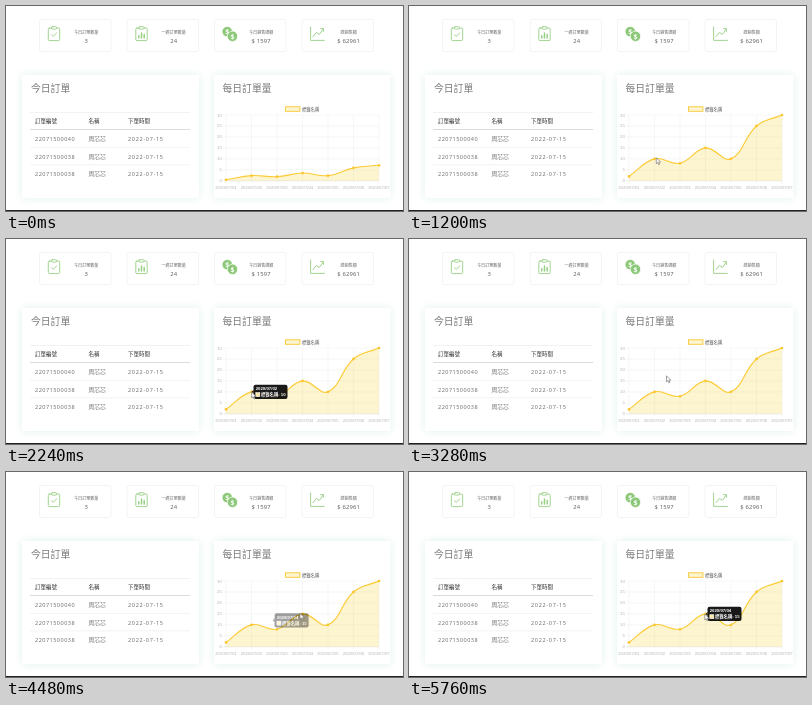
These frames come from a looping animation (397x205 px, 6.16 s). An HTML page:

```html
<!DOCTYPE html>
<html lang="zh-Hant">
<head>
<meta charset="utf-8">
<title>訂單</title>
<style>
  html, body { margin: 0; width: 100%; height: 100%; overflow: hidden; background: #fff; }
  svg { display: block; width: 100%; height: 100%; }
  text { font-family: "Open Sans", "Noto Sans CJK TC", "Noto Sans CJK JP", sans-serif; fill: #555; }
  .title { font-size: 9.8px; font-weight: 300; fill: #777; }
  .label { font-size: 4.05px; text-anchor: middle; fill: #666; }
  .total { font-size: 5.8px; text-anchor: middle; letter-spacing: .2px; }
  .head { font-size: 5.5px; fill: #333; font-weight: 500; }
  .cell { font-size: 5.5px; letter-spacing: .5px; fill: #666; }
  .name { font-size: 5.8px; fill: #777; }
  .date { font-size: 5.5px; letter-spacing: .7px; }
  .chart text, .tip text { font-family: "Liberation Sans", "Noto Sans CJK TC", "Noto Sans CJK JP", sans-serif; font-size: 4.3px; }
  .chart .tick { fill: #b4b4b4; }
  .tip text { fill: #fff; font-weight: 700; }
  .card { fill: #fff; stroke: #eef1f1; stroke-width: .8; }
  .panel { fill: #fff; filter: drop-shadow(0 0 4px #e0f1ef); }
  .icon { fill: none; stroke: #98cf85; stroke-width: .9; stroke-linejoin: round; stroke-linecap: round; }
  .icon .solid { fill: #8cc878; stroke: none; }
</style>
</head>
<body>
<svg id="stage" viewBox="0 0 397 205" preserveAspectRatio="none"></svg>
<script>
const LOOP = 6160;
const values = [2, 10, 8, 15, 10, 25, 30];
const BASE = 174.8, TOP = 109;
const px = i => 220 + i * 25.5;
const py = v => BASE - v * (BASE - TOP) / 30;
const day = i => `2020/07/0${i + 1}`;
const clamp = (v, a, b) => Math.min(b, Math.max(a, v));
const easeOut = t => 1 - (1 - clamp(t, 0, 1)) ** 4;

const text = (x, y, s, cls, extra = '') => `<text x="${x}" y="${y}" class="${cls}" ${extra}>${s}</text>`;
const line = (x1, y1, x2, y2, color, w = .5) =>
  `<path d="M${x1} ${y1}L${x2} ${y2}" stroke="${color}" stroke-width="${w}"/>`;

const clipboard = inner => `<rect x="8.8" y="22" width="11.4" height="12.6" rx="1.2"/>
  <rect x="12" y="20.7" width="5" height="2.4" rx=".8" fill="#fff"/>${inner}`;
const coin = (x, y) => `<circle class="solid" cx="${x}" cy="${y}" r="5.2" style="stroke:#fff;stroke-width:.7"/>` +
  text(x, y + 2.5, '$', '', 'style="font-size:7px;font-weight:700;fill:#fff;stroke:none" text-anchor="middle"');

const cards = [
  ['今日訂單數量', '3', clipboard('<path d="M12 28.6l1.8 1.8 3.4-3.6"/>')],
  ['一週訂單數量', '24', clipboard('<path d="M11.8 32v-2.2M14.5 32v-5M17.2 32v-3.6" stroke-width="1.5"/>')],
  ['今日銷售總額', '$ 1597', coin(12.8, 25.6) + coin(18, 30.3)],
  ['總銷售額', '$ 62961', '<path d="M8.6 21v13.4h13.8M11 30.6l3.4-4.2 3 2 4-5.6M18.6 22.6h2.8v2.8"/>']
].map(([label, total, icon], i) => `<g transform="translate(${33.5 + i * 87.5} 0)">
  <rect class="card" x="0" y="13.5" width="71.5" height="32" rx="2"/>
  <g class="icon">${icon}</g>
  ${text(46.7, 27.6, label, 'label')}${text(46.7, 37.4, total, 'total')}</g>`).join('');

const rows = ['22071500040', '22071500038', '22071500038'].map((id, i) => {
  const y = 135.2 + i * 17.4;
  return text(29, y, id, 'cell') + text(82.5, y, '周芯芯', 'name') + text(122, y, '2022-07-15', 'cell date') +
    (i ? line(24, y - 11.2, 184, y - 11.2, '#e6e8e8') : '');
}).join('');

const table = text(25, 86.2, '今日訂單', 'title') +
  line(24, 106.5, 184, 106.5, '#e2e6e6') + line(24, 123.5, 184, 123.5, '#cfd4d4', .8) +
  text(29, 117.3, '訂單編號', 'head') + text(82.5, 117.3, '名稱', 'head') + text(122, 117.3, '下單時間', 'head') + rows;

let grid = '';
for (let v = 0; v <= 30; v += 5) {
  grid += line(217, py(v), px(6), py(v), v ? '#ececec' : '#d8d8d8') +
    text(215.8, py(v) + 1.5, v, 'tick', 'text-anchor="end"');
}
values.forEach((v, i) => {
  grid += line(px(i), TOP, px(i), 177.5, '#ececec') + text(px(i), 182.6, day(i), 'tick', 'text-anchor="middle"');
});

document.getElementById('stage').innerHTML = `
  ${cards}
  <rect class="panel" x="16" y="69" width="177" height="123" rx="1"/>
  <rect class="panel" x="208" y="69" width="176.5" height="123" rx="1"/>
  ${table}
  ${text(216.5, 86.2, '每日訂單量', 'title')}
  <g class="chart">
    <rect x="279.5" y="100.8" width="14.4" height="4.5" fill="#fdf4d0" stroke="#fbcd45"/>
    ${text(296, 104.7, '標籤名稱', '')}
    ${grid}
    <path id="area" fill="#f7d23a" fill-opacity=".24"/>
    <path id="curve" fill="none" stroke="#fccb35" stroke-width="1.1"/>
    <g id="dots" fill="#fbc62e"></g>
  </g>
  <g id="tip" class="tip">
    <path d="M0 5.4l-1.8 1.8 1.8 1.8z" fill-opacity=".9"/>
    <rect width="34" height="14.4" rx="2" fill-opacity=".9"/>
    <text id="tipTitle" x="2.2" y="5.7"></text>
    <rect x="2.3" y="8" width="4" height="4" fill="#fbe7a6" stroke="#fff" stroke-width=".6"/>
    <text id="tipBody" x="7.5" y="11.8"></text>
  </g>
  <path id="cursor" d="M0 0v6l1.4-1.2 1 2.2 1-.45-1-2.1h1.9z" fill="#fff" stroke="#666" stroke-width=".6" stroke-linejoin="round"/>
  <rect y="204" width="397" height="1" fill="#222"/>`;

const el = id => document.getElementById(id);

// Smooth curve with tension 0.4, handles kept inside the plot
function curvePath(p) {
  const handles = p.map((c, i) => {
    const a = p[i - 1] || c, b = p[i + 1] || c;
    const d1 = Math.hypot(c[0] - a[0], c[1] - a[1]), d2 = Math.hypot(b[0] - c[0], b[1] - c[1]);
    const at = k => [c[0] + k * (b[0] - a[0]), clamp(c[1] + k * (b[1] - a[1]), TOP, BASE)];
    return { before: at(-.4 * d1 / (d1 + d2)), after: at(.4 * d2 / (d1 + d2)) };
  });
  return 'M' + p[0] + p.slice(1).map((c, i) => `C${handles[i].after} ${handles[i + 1].before} ${c}`).join('');
}

function drawChart(t) {
  const grow = easeOut((t + 65) / 1000);
  const pts = values.map((v, i) => [px(i), py(v * grow)]);
  const d = curvePath(pts);
  el('curve').setAttribute('d', d);
  el('area').setAttribute('d', `${d}V${BASE}H${px(0)}Z`);
  el('dots').innerHTML = pts.map(([x, y]) => `<circle cx="${x}" cy="${y}" r="1.35"/>`).join('');
}

function drawTip(t) {
  const second = t >= 4430;
  const move = second ? easeOut((t - 4430) / 400) : 0;
  const fade = second ? move : easeOut((t - 1400) / 400) * (1 - easeOut((t - 2860) / 400));
  const i = second ? 3 : 1;
  const x = px(1) + (px(3) - px(1)) * move + 2;
  const y = py(10) + (py(15) - py(10)) * move - 7.2;
  el('tip').setAttribute('transform', `translate(${x} ${y})`);
  el('tip').setAttribute('opacity', fade);
  el('tipTitle').textContent = day(i);
  el('tipBody').textContent = `標籤名稱: ${values[i]}`;
}

// time, x, y
const track = [
  [320, 10, 24], [560, 88, 75], [880, 232, 143], [1040, 247.3, 151.7], [1280, 247.3, 151.7],
  [1840, 245.7, 153], [2880, 245.7, 153], [3280, 257.5, 136.8], [3600, 262, 135],
  [4160, 285, 145], [4480, 294, 141.3], [4800, 295.8, 142], [LOOP, 295.8, 142]
];

function drawCursor(t) {
  el('cursor').setAttribute('visibility', t < track[0][0] ? 'hidden' : 'visible');
  const n = Math.max(1, track.findIndex(k => k[0] > t));
  const [t0, x0, y0] = track[n - 1], [t1, x1, y1] = track[n];
  const k = (t - t0) / (t1 - t0);
  el('cursor').setAttribute('transform', `translate(${x0 + (x1 - x0) * k} ${y0 + (y1 - y0) * k})`);
}

function frame() {
  let t = performance.now() % LOOP;
  t -= t % (t < 320 ? 160 : 80);
  drawChart(t);
  drawTip(t);
  drawCursor(t);
  requestAnimationFrame(frame);
}
frame();
</script>
</body>
</html>
```
